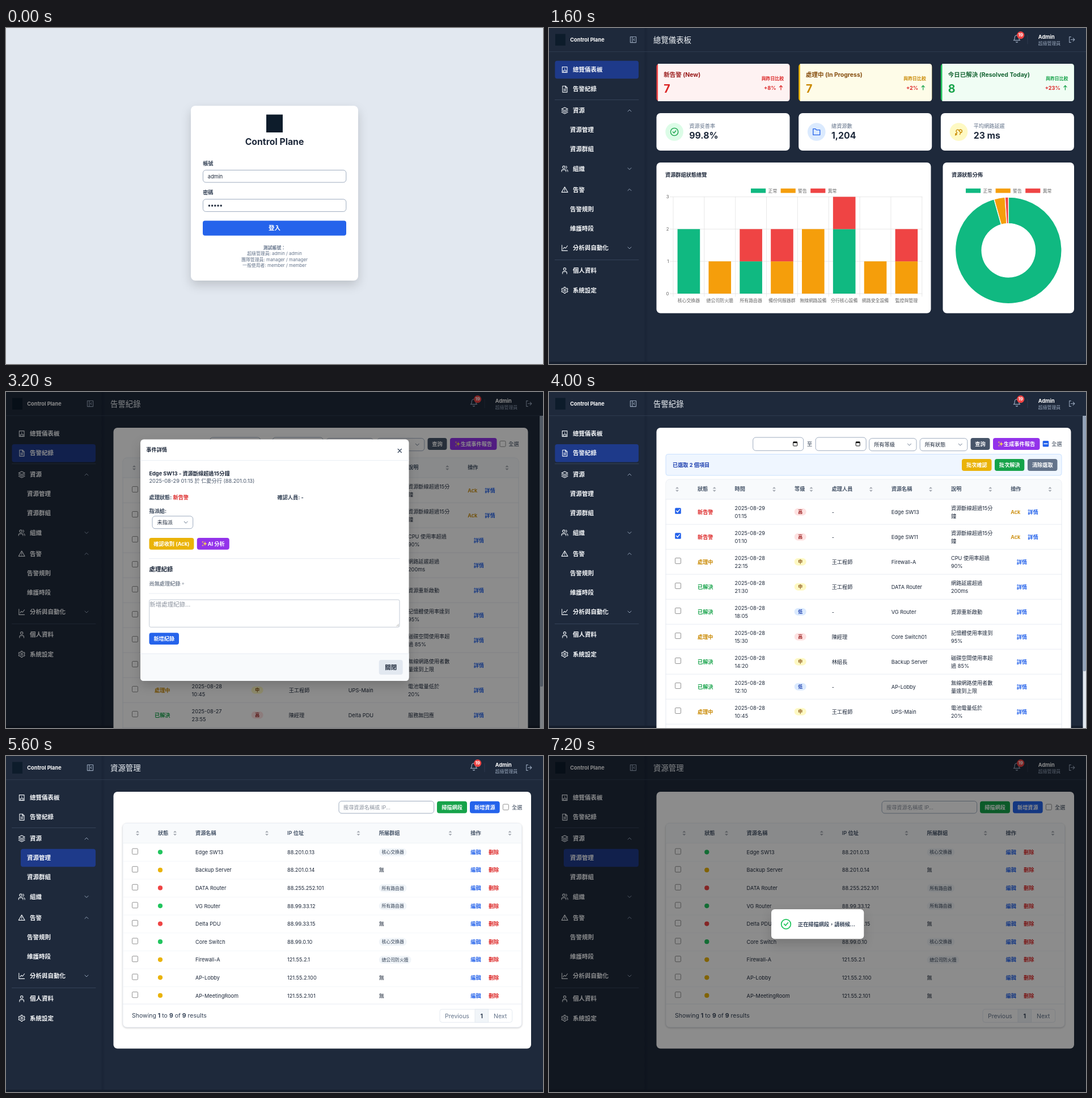
Recreate the animation shown at these times as an HTML page. Size 947x592 px, loop 8000 ms.

```html
<!DOCTYPE html>
<html lang="zh-Hant">
<head>
<meta charset="utf-8">
<title>Control Plane</title>
<style>
html, body { margin: 0; width: 100%; height: 100%; overflow: hidden; background: #1e293b; }
svg { display: block; width: 947px; height: 592px; }
text { font-family: Inter, "Noto Sans CJK TC", "Noto Sans CJK", sans-serif; white-space: pre; }
.scene { display: none; }
.scene.on { display: inline; }
.lift { filter: drop-shadow(0 8px 9px rgba(0,0,0,.16)); }
.low { filter: drop-shadow(0 1px 1.5px rgba(0,0,0,.2)); }
</style>
</head>
<body>
<svg id="stage" viewBox="0 0 947 592"></svg>
<script>
const C = {
  ink: '#1e293b', text: '#334155', mute: '#64748b', line: '#e2e8f0', edge: '#94a3b8',
  blue: '#2563eb', red: '#dc2626', gold: '#ca8a04', green: '#16a34a', purple: '#9333ea',
  slate: '#475569', ok: '#10b981', warn: '#f59e0b', bad: '#ef4444', logo: '#0d1c2b'
};
const S = 7.9, M = 9.2, L = 10.5, XL = 13.15;

// y is the vertical middle of the line
const text = (x, y, s, size = M, fill = C.ink, weight = 400, anchor = 'start') =>
  `<text x="${x}" y="${y + size * .36}" font-size="${size}" font-weight="${weight}" fill="${fill}" text-anchor="${anchor}">${s}</text>`;
const bold = (x, y, s, size, fill, anchor) => text(x, y, s, size, fill, 700, anchor);
const box = (x, y, x2, y2, fill, r = 0, stroke = 'none', extra = '') =>
  `<rect x="${x}" y="${y}" width="${x2 - x}" height="${y2 - y}" rx="${r}" fill="${fill}" stroke="${stroke}" ${extra}/>`;
const dot = (x, y, r, fill) => `<circle cx="${x}" cy="${y}" r="${r}" fill="${fill}"/>`;
const path = (d, stroke, w = 1, fill = 'none') =>
  `<path d="${d}" fill="${fill}" stroke="${stroke}" stroke-width="${w}" stroke-linecap="round" stroke-linejoin="round"/>`;
const rule = (x, x2, y, color = C.line) => path(`M${x} ${y}H${x2}`, color, .8);
const button = (x, y, x2, y2, fill, label, size = M, color = '#fff') =>
  box(x, y, x2, y2, fill, 4) + bold((x + x2) / 2, (y + y2) / 2, label, size, color, 'middle');
const field = (x, y, x2, y2, r = 5) => box(x, y, x2, y2, '#fff', r, C.edge, 'stroke-width=".9"');
const chevron = (x, y, dir = 1, color = C.mute) => path(`M${x - 3} ${y - 1.5 * dir}l3 ${3 * dir}l3 ${-3 * dir}`, color, 1);
const select = (x, y, x2, y2, label) =>
  field(x, y, x2, y2) + text(x + 8.5, (y + y2) / 2, label) + chevron(x2 - 12.5, (y + y2) / 2);
const sorter = (x, y) => path(`M${x - 3} ${y - 1.3}h6l-3-3zM${x - 3} ${y + 1.3}h6l-3 3z`, 'none', 0, '#a3a8b0');
const check = (x, y, state) => state
  ? box(x - 5.3, y - 5.3, x + 5.3, y + 5.3, C.blue, 1.6) +
    path(state == 'some' ? `M${x - 3} ${y}h6` : `M${x - 2.8} ${y}l2 2.2l3.6-4.6`, '#fff', 1.4)
  : box(x - 5, y - 5, x + 5, y + 5, '#fff', 1.6, '#767676', 'stroke-width=".8"');
const close = (x, y) => path(`M${x - 3} ${y - 3}l6 6m0-6l-6 6`, C.slate, 1.5);
const star = (x, y, r, fill) => {
  const q = r * .22;
  return path(`M${x} ${y - r}L${x + q} ${y - q}L${x + r} ${y}L${x + q} ${y + q}L${x} ${y + r}L${x - q} ${y + q}L${x - r} ${y}L${x - q} ${y - q}z`, 'none', 0, fill);
};
const sparkle = (x, y, fill) => star(x + 1, y, 4.2, fill) + star(x - 3, y - 3, 2, fill) + star(x - 3, y + 3.2, 1.8, fill);

const icons = {
  board: 'M4 3h16v18H4zM4 16h5l2-3h3l2 3h4M12 8v1M9 21v-3M15 21v-3',
  file: 'M5 2h10l5 5v15H5zM14 2v6h6M9 12h7M9 16h7',
  layers: 'M12 2L2 7l10 5l10-5zM2 12l10 5l10-5M2 17l10 5l10-5',
  users: 'M2 21v-2a4 4 0 0 1 4-4h6a4 4 0 0 1 4 4v2M5 7a4 4 0 1 0 8 0a4 4 0 1 0-8 0M22 21v-2a4 4 0 0 0-3-3.9M16 3.2a4 4 0 0 1 0 7.7',
  alert: 'M12 3L2 20h20zM12 9v5M12 17v.2',
  chart: 'M3 3v18h18M7 15l4-5l4 3l6-8',
  user: 'M8 7a4 4 0 1 0 8 0a4 4 0 1 0-8 0M5 22v-3a4 4 0 0 1 4-4h6a4 4 0 0 1 4 4v3',
  gear: 'M9 12a3 3 0 1 0 6 0a3 3 0 1 0-6 0M10 2h4l.6 3l2.6 1.5l3-1l2 3.5l-2.3 2v2l2.3 2l-2 3.5l-3-1l-2.6 1.5l-.6 3h-4l-.6-3l-2.6-1.5l-3 1l-2-3.5l2.3-2v-2l-2.3-2l2-3.5l3 1l2.6-1.5z',
  panel: 'M3 3h18v18H3zM9 3v18M16 9l-3 3l3 3',
  bell: 'M6 9a6 6 0 0 1 12 0c0 7 3 8 3 8H3s3-1 3-8M10 21a2 2 0 0 0 4 0',
  exit: 'M9 21H4V3h5M16 17l5-5l-5-5M21 12H9',
  done: 'M2 12a10 10 0 1 0 20 0a10 10 0 1 0-20 0M8 12l3 3l5-6',
  folder: 'M3 4h6l3 3h9v13H3z',
  rocket: 'M3 21l5-7M8 14a4 4 0 1 1 5-5a4 4 0 1 1 4 5l-4-5M4 16a2 2 0 1 0 3 3M17 14l-2 5'
};
const icon = (name, x, y, size, color, w = 2) =>
  `<g transform="translate(${x - size / 2} ${y - size / 2}) scale(${size / 24})">${path(icons[name], color, w)}</g>`;

const menu = [
  ['總覽儀表板', 73.5, 'board'], ['告警紀錄', 107.7, 'file'], ['資源', 145.5, 'layers', -1],
  ['資源管理', 179.5], ['資源群組', 213.7], ['組織', 248, 'users', 1], ['告警', 285, 'alert', -1],
  ['告警規則', 319], ['維護時段', 353.2], ['分析與自動化', 387.5, 'chart', 1],
  ['個人資料', 427.5, 'user'], ['系統設定', 462, 'gear']
];

function shell(title, bell = '#94a3b8') {
  let s = box(0, 0, 947, 592, C.ink) + box(167, 0, 175, 592, 'url(#seam)') + box(0, 588, 947, 592, '#151e2d');
  s += rule(0, 947, 41.7, '#334155') + box(11, 10.5, 29, 31, C.logo) + bold(37.3, 20.7, 'Control Plane', M, '#fff');
  s += icon('panel', 148.5, 20.5, 13.5, '#94a3b8') + text(184, 20.7, title, 13.4, '#f1f5f9', 500);
  s += icon('bell', 825, 18.5, 15, bell) + dot(831.7, 12.6, 6.6, C.bad) + bold(831.7, 12.6, '19', S, '#fff', 'middle');
  s += path('M844 13V28', '#334155', .8) + bold(862.8, 16, 'Admin', M, '#fff') + text(862.8, 27.5, '超級管理員', S, '#94a3b8');
  s += icon('exit', 922, 20.5, 13, '#94a3b8') + rule(10.5, 158, 126.5, '#3b4a60') + rule(10.5, 158, 408.5, '#3b4a60');
  for (const [label, y, ic, dir] of menu) {
    if (label == title) s += box(ic ? 10.5 : 26, y - 15.7, 158, y + 15.7, '#1e3a8a', 4);
    if (ic) s += icon(ic, 27.7, y, 13, '#f1f5f9');
    if (dir) s += chevron(142, y, dir, '#94a3b8');
    s += bold(ic ? 42 : 37, y, label, L, '#f8fafc');
  }
  return s;
}

function login() {
  let s = box(0, 0, 947, 592, '#e2e8f0') + box(326, 137, 621, 445, '#fff', 8, 'none', 'class="lift"');
  s += box(459, 152.5, 488, 184, C.logo) + bold(473.5, 200.5, 'Control Plane', 15.8, C.ink, 'middle');
  s += bold(347.2, 238.3, '帳號', M, C.text) + field(347.4, 250.4, 599.8, 272) + text(355.8, 261.3, 'admin');
  s += bold(347.2, 289.5, '密碼', M, C.text) + field(347.4, 301.7, 599.8, 323.4);
  for (let i = 0; i < 5; i++) s += dot(358.4 + i * 5.2, 313, 1.7, C.ink);
  s += button(347, 339.5, 600, 365.7, C.blue, '登入', L);
  s += bold(473.5, 386.7, '測試帳號：', S, C.mute, 'middle');
  ['超級管理員: admin / admin', '團隊管理員: manager / manager', '一般使用者: member / member']
    .forEach((t, i) => s += text(473.5, 397.2 + i * 10.5, t, S, C.mute, 400, 'middle'));
  return s;
}

function legend(x) {
  return [['正常', C.ok], ['警告', C.warn], ['異常', C.bad]].map(([t, c], i) =>
    box(x + i * 52.6, 282.8, x + 26.2 + i * 52.6, 290.6, c) + text(x + 30.5 + i * 52.6, 286.8, t, S, '#666')).join('');
}

function slice(from, to, color) {
  const at = (a, r) => `${810.3 + r * Math.sin(a * Math.PI / 180)} ${391.8 - r * Math.cos(a * Math.PI / 180)}`;
  const big = to - from > 180 ? 1 : 0, R = 93.8, r = 47.2;
  return path(`M${at(from, R)}A${R} ${R} 0 ${big} 1 ${at(to, R)}L${at(to, r)}A${r} ${r} 0 ${big} 0 ${at(from, r)}z`, '#fff', 1.3, color);
}

function dashboard() {
  let s = shell('總覽儀表板');
  const top = [
    ['新告警 (New)', 7, '+8%', '#fef2f2', C.bad, '#991b1b', C.red, C.red],
    ['處理中 (In Progress)', 7, '+2%', '#fefce8', '#eab308', '#854d0e', C.gold, C.green],
    ['今日已解決 (Resolved Today)', 8, '+23%', '#f0fdf4', '#22c55e', '#166534', C.green, C.green]
  ];
  top.forEach(([t, n, pct, bg, bar, dark, mid, arrow], i) => {
    const x = 189.5 + i * 250.7;
    s += box(x, 63, x + 235, 129, bar, 5) + path(`M${x + 2.6} 63H${x + 230}q5 0 5 5V124q0 5-5 5H${x + 2.6}z`, 'none', 0, bg);
    s += bold(x + 12.8, 82, t, L, dark) + bold(x + 12.8, 106.5, n, 19.7, mid);
    s += bold(x + 224.6, 89.2, '與昨日比較', S, mid, 'end') + bold(x + 211, 105.3, pct, M, C.red, 'end');
    s += path(`M${x + 219.5} 109V101.5m-2.6 2.6l2.6-2.6l2.6 2.6`, arrow, 1.2);
  });
  const facts = [
    ['資源妥善率', '99.8%', 'done', '#dcfce7', C.green], ['總資源數', '1,204', 'folder', '#dbeafe', C.blue],
    ['平均網路延遲', '23 ms', 'rocket', '#fef9c3', C.gold]
  ];
  facts.forEach(([t, v, ic, bg, c], i) => {
    const x = 189.5 + i * 250.7;
    s += box(x, 150, x + 235, 216, '#fff', 7) + dot(x + 31.6, 183, 15.8, bg) + icon(ic, x + 31.6, 183, 16, c);
    s += text(x + 57.8, 172.3, t, M, C.mute) + bold(x + 57.8, 189.7, v, 15.8);
  });
  s += box(189.5, 237, 673.5, 502.5, '#fff', 7) + box(694.5, 237, 926, 502.5, '#fff', 7);
  s += bold(205, 259, '資源群組狀態總覽') + bold(710, 259, '資源狀態分佈') + legend(356) + legend(735);
  const step = 54.85, unit = 56.85, base = 468;
  for (let v = 0; v < 4; v++) s += rule(213.5, 658, base - v * unit, '#e3e3e3') + text(211.5, base - v * unit, v, S, '#666', 400, 'end');
  for (let i = 0; i < 9; i++) s += path(`M${219 + i * step} 297.5V473`, '#e3e3e3', .8);
  const bars = [
    ['核心交換器', 2, 0, 0], ['總公司防火牆', 0, 1, 0], ['所有路由器', 1, 0, 1], ['備份伺服器群', 0, 1, 1],
    ['無線網路設備', 0, 2, 0], ['分行核心設備', 2, 0, 1], ['網路安全設備', 0, 1, 0], ['監控與管理', 0, 1, 1]
  ];
  bars.forEach(([t, ...vals], i) => {
    const x = 219 + (i + .5) * step;
    let y = base;
    vals.forEach((v, k) => {
      if (v) s += box(x - 19.8, y - v * unit, x + 19.8, y, [C.ok, C.warn, C.bad][k]);
      y -= v * unit;
    });
    s += text(x, 480, t, S, '#666', 400, 'middle');
  });
  return s + slice(0, 344.3, C.ok) + slice(344.3, 356.3, C.warn) + slice(356.3, 360, C.bad);
}

const states = { 新: ['新告警', C.red], 處: ['處理中', C.gold], 已: ['已解決', C.green] };
const levels = { 高: ['#fee2e2', '#991b1b'], 中: ['#fef9c3', '#854d0e'], 低: ['#dbeafe', '#1e40af'] };
const alerts = [
  '新|2025-08-29|01:15|高|-|Edge SW13|資源斷線超過15分|鐘',
  '新|2025-08-29|01:10|高|-|Edge SW11|資源斷線超過15分|鐘',
  '處|2025-08-28|22:15|中|王工程師|Firewall-A|CPU 使用率超過|90%',
  '已|2025-08-28|21:30|中|王工程師|DATA Router|網路延遲超過|200ms',
  '已|2025-08-28|18:05|低|-|VG Router|資源重新啟動',
  '處|2025-08-28|15:30|高|陳經理|Core Switch01|記憶體使用率達到|95%',
  '已|2025-08-28|14:20|中|林組長|Backup Server|磁碟空間使用率超|過 85%',
  '已|2025-08-28|12:10|低|-|AP-Lobby|無線網路使用者數|量達到上限',
  '處|2025-08-28|10:45|中|王工程師|UPS-Main|電池電量低於|20%',
  '已|2025-08-27|23:55|高|陳經理|Delta PDU|服務無回應'
];

function alertList(picked, bell) {
  const off = picked ? 38 : 0;
  let s = shell('告警紀錄', bell) + box(189.5, 63, 920.5, 610, '#fff', 7);
  s += box(941.5, 42, 947, 592, '#e2e8f0') + box(941.5, 42, 947, picked ? 492 : 519, '#94a3b8', 2);
  for (const x of [359.7, 470.2]) {
    s += field(x, 80, x + 89, 103.3) + box(x + 71, 88, x + 78, 95, 'none', .8, '#111', 'stroke-width="1"') + box(x + 71, 87.5, x + 78, 90, '#111');
  }
  s += text(459.6, 91.5, '至', M, C.text, 400, 'middle') + select(564.7, 81.7, 648, 103.7, '所有等級') + select(654.2, 81.7, 737.8, 103.7, '所有狀態');
  s += button(743.5, 81, 777.5, 102, C.slate, '查詢') + box(783, 81, 865.5, 102, C.purple, 4) + sparkle(796.5, 91.5, '#fde047') + bold(802, 91.5, '生成事件報告', M, '#fff');
  s += check(876, 91.3, picked && 'some') + text(886.3, 91.5, '全選', M, C.text);
  if (picked) {
    s += box(206, 109.5, 904, 147, '#eff6ff', 4, '#bfdbfe', 'stroke-width=".8"') + bold(218, 128.5, '已選取 2 個項目', M, '#1e40af');
    s += button(728, 118, 780.5, 139, '#eab308', '批次確認') + button(786, 118, 838.3, 139, C.green, '批次解決') + button(844, 118, 896.5, 139, C.mute, '清除選取');
  }
  s += `<g transform="translate(0 ${off})">` + box(206, 116, 904, 620, '#fff', 7, C.line, 'stroke-width=".9"');
  s += path('M206.4 151V123q0-6.6 6.6-6.6H897q6.6 0 6.6 6.6V151z', 'none', 0, '#f8fafc') + rule(206, 904, 151);
  const heads = [['', 0, 226], ['狀態', 262, 291.7], ['時間', 327.6, 397], ['等級', 433, 462.5], ['處理人員', 498.7, 567.8], ['資源名稱', 603.7, 673], ['說明', 709, 778.3], ['操作', 814.2, 883.5]];
  for (const [t, x, sx] of heads) s += text(x, 133, t, M, C.slate, 600) + sorter(sx, 133.5);
  alerts.forEach((row, i) => {
    const y = 173.2 + i * 44, [st, day, time, lv, who, res, d1, d2] = row.split('|');
    const [label, color] = states[st], [bg, fg] = levels[lv];
    s += check(227.5, y - 1.7, picked && i < 2) + bold(262, y, label, M, color);
    s += text(327.6, y - 6.8, day) + text(327.6, y + 7, time);
    s += box(432.7, y - 6.5, 453.6, y + 6.5, bg, 6.5) + bold(443.2, y, lv, S, fg, 'middle');
    s += text(498.7, y, who) + text(603.7, y, res);
    s += d2 ? text(709, y - 6.8, d1) + text(709, y + 7, d2) : text(709, y, d1);
    if (i < 2) s += text(814.2, y, 'Ack', M, C.gold, 600);
    s += bold(i < 2 ? 844.3 : 824.7, y, '詳情', M, C.blue) + rule(206, 904, y + 22);
  });
  return s + '</g>';
}

const dim = box(0, 0, 947, 592, '#000', 0, 'none', 'opacity=".45"');
const modal = (y, y2, headY, footY) => dim + box(237, y, 710.5, y2, '#fff', 6, 'none', 'class="lift"') +
  path(`M237 ${footY}H710.5V${y2 - 6}q0 6-6 6H243q-6 0-6-6z`, 'none', 0, '#f8fafc') +
  rule(237, 710.5, headY) + rule(237, 710.5, footY);

function detail() {
  let s = alertList(false) + modal(83.5, 509, 120.7, 461);
  s += bold(247.3, 102, '事件詳情') + close(694.3, 103.5) + bold(252.5, 143.3, 'Edge SW13 - 資源斷線超過15分鐘');
  s += text(252.5, 156.7, '2025-08-29 01:15 於 仁愛分行 (88.201.0.13)', M, C.slate);
  s += bold(252.5, 185.5, '處理狀態: <tspan fill="#dc2626">新告警</tspan>', M, C.text) + bold(478.5, 185.5, '確認人員: -', M, C.text);
  s += bold(252.5, 209.3, '指派給:', M, C.text) + select(258, 218.7, 329.7, 240.7, '未指派');
  s += button(252.5, 257, 331.4, 277.7, '#eab308', '確認收到 (Ack)') + box(336.8, 257, 393.8, 277.7, C.purple, 4) + sparkle(350, 267.3, '#fde047') + bold(355.7, 267.3, 'AI 分析', M, '#fff');
  s += rule(252.5, 694.3, 293.5) + bold(252.5, 312.7, '處理紀錄', L) + text(252.5, 337.5, '尚無處理紀錄。', M, C.slate) + rule(252.5, 694.3, 355);
  s += box(252.7, 366, 694, 414.3, '#fff', 2.5, '#bcc5d1', 'stroke-width=".9"') + text(253.2, 374.7, '新增處理紀錄...', L, '#8b929e') + path('M689 412.5l3.5-3.5M691.3 412.7l1.4-1.4', '#888', .7);
  return s + button(252.5, 424.3, 305, 445, C.blue, '新增紀錄') + button(657.7, 472, 699.7, 498, C.line, '關閉', L, C.ink);
}

// y, x, line; a leading "-" gives the line a bullet
const report = [
  [121.3, 252.5, '**1. 事件摘要:'],
  [175.7, 252.5, '26 左右，監控系統偵測到仁愛分行兩台核心交換器 (Edge SW13, Edge SW11) 同時發生斷線'],
  [191.5, 252.5, '告警，持續時間超過15分鐘。此事件可能導致該分行內部網路服務全面中斷。 **2. 事件時間'],
  [207.3, 252.5, '軸:'],
  [267.4, 252.5, '26: 系統發出告警，資源 Edge SW13 (88.201.0.13) 斷線超過15分鐘。'],
  [283, 268.2, '-2025.8.26 10:26: 系統發出告警，資源 Edge SW11 (88.201.0.11) 斷線超過15分鐘。'],
  [309.4, 252.5, '**3. 影響評估:** 由於斷線資源為分行核心交換器，預期將造成以下影響：'],
  [325, 268.2, '-分行所有員工的電腦無法上網及存取內部資源。'],
  [341, 284, '-分行對外業務系統 (如：交易系統) 可能中斷。'],
  [356.7, 299.8, '-IP 電話、印表機等網路資源無法使用。'],
  [383, 284, '**4. 根本原因分析:** 兩台位於同一分行的核心交換器在完全相同的時間點斷線，極不'],
  [398.7, 284, '可能是單一資源故障。最可能的原因指向該分行的**上層網路或基礎設施問題**，例'],
  [414.4, 284, '如：'],
  [430.3, 299.8, '-**總電源中斷：** 該分行或機櫃發生跳電。'],
  [446.2, 315.6, '-**上聯路由器故障：** 連接總公司的主要路由器 (Router) 當機或斷線。'],
  [462, 331.4, '-**線路問題：** 該分行的主要對外線路中斷。'],
  [488.4, 315.6, '**5. 後續處理建議:**'],
  [504.2, 331.4, '-**立即行動：** 立刻聯繫仁愛分行IT人員，確認現場電力與主要路由器狀']
];

function analysis() {
  let s = alertList(true) + modal(30, 562, 67, 515);
  s += star(257.3, 49, 5, C.purple) + star(251.5, 44.5, 2.6, C.purple) + star(258, 42, 1.6, C.purple);
  s += bold(268.2, 48, 'Quorvi AI 分析報告') + close(694.3, 49.5) + box(705, 67.5, 710.5, 514.6, '#f1f5f9') + box(705, 67.5, 710.5, 431, '#94a3b8', 2);
  s += bold(252.5, 92.5, '網路事件報告：仁愛分行多重資源斷線事件', XL) + bold(252.5, 153.7, '本日上午 10:', 11.8);
  s += dot(260.7, 240.5, 1.5, C.ink) + bold(268.2, 240, '2025.8.26 10:', 11.8);
  for (const [y, x, t] of report) {
    const item = t[0] == '-';
    s += (item ? dot(x - 7.2, y + .5, 1.4, C.text) : '') + text(x, y, item ? t.slice(1) : t, L, C.text);
  }
  return s + button(247.2, 525.7, 310.4, 552, C.slate, '複製報告', L);
}

const G = '#22c55e', Y = '#eab308', R = '#ef4444';
const assets = [
  [G, 'Edge SW13', '88.201.0.13', '核心交換器'], [Y, 'Backup Server', '88.201.0.14'],
  [R, 'DATA Router', '88.255.252.101', '所有路由器'], [G, 'VG Router', '88.99.33.12', '所有路由器'],
  [R, 'Delta PDU', '88.99.33.15'], [G, 'Core Switch', '88.99.0.10', '核心交換器'],
  [Y, 'Firewall-A', '121.55.2.1', '總公司防火牆'], [Y, 'AP-Lobby', '121.55.2.100'], [Y, 'AP-MeetingRoom', '121.55.2.101']
];

function assetList(cols, sorts) {
  let s = shell('資源管理') + box(189.5, 63, 926, 515.5, '#fff', 7);
  s += field(587, 79.5, 754.7, 101) + text(595, 90.3, '搜尋資源名稱或 IP...', M, '#8b929e');
  s += button(760, 79.7, 813, 100.7, C.green, '掃描網段') + button(818, 79.7, 870.7, 100.7, C.blue, '新增資源') + check(881.4, 90) + text(892, 90.3, '全選', M, C.text);
  s += box(206, 118.5, 909.5, 478, '#fff', 7, C.line, 'stroke-width=".8" class="low"');
  s += path('M206.4 153.5V125q0-6.2 6.2-6.2H903q6.2 0 6.2 6.2V153.5z', 'none', 0, '#f8fafc') + rule(206, 909.5, 153.5, '#edf1f5');
  const [st, name, ip, group, act] = cols;
  ['狀態', '資源名稱', 'IP 位址', '所屬群組', '操作'].forEach((t, i) => s += text(cols[i], 135.7, t, M, C.slate, 600));
  sorts.forEach(x => s += sorter(x, 136));
  assets.forEach(([c, n, addr, g], i) => {
    const y = 169.6 + i * 31.58;
    s += check(227.5, y - 1.5) + dot(st + 4, y - .3, 4.1, c) + text(name, y, n) + text(ip, y, addr);
    s += g ? box(group, y - 7, group + g.length * S + 9.5, y + 7, '#f1f5f9', 7) + text(group + 4.7, y, g, S, C.text) : text(group, y, '無');
    s += bold(act, y, '編輯', M, C.blue) + bold(act + 31.6, y, '刪除', M, C.red);
    if (i < 8) s += rule(206.5, 909, y + 15.8, '#f1f5f9');
  });
  const b = n => `<tspan font-weight="700">${n}</tspan>`;
  s += rule(206, 909.5, 437) + text(222, 457.7, `Showing ${b(1)} to ${b(9)} of ${b(9)} results`, L, C.text);
  s += box(765, 446.2, 892.7, 469.3, '#fff', 4, C.line, 'stroke-width=".9"') + box(827, 446.2, 850.5, 469.3, '#f1f5f9', 0, C.line, 'stroke-width=".9"');
  return s + text(774, 458, 'Previous', L, C.mute) + bold(838.7, 458, '1', L, C.text, 'middle') + text(860, 458, 'Next', L, C.mute);
}

function scanning() {
  return assetList([274.3, 348.6, 516.8, 666.5, 805.5], [238.3, 313, 480.8, 630.5, 769.7, 888.5]) + dim +
    box(392, 270, 555.3, 322.3, '#fff', 6, 'none', 'class="lift"') +
    icon('done', 418, 296.2, 20, G, 2.1) + bold(439, 296.3, '正在掃描網段，請稍候...', M, C.text);
}

const scenes = [
  [0, login()],
  [800, dashboard()],
  [2400, alertList(false, '#fff')],
  [3200, detail()],
  [4000, alertList(true)],
  [4800, analysis()],
  [5600, assetList([268, 334, 496, 657.7, 819.3], [232, 298, 460, 621.5, 783.5, 888.5])],
  [6400, scanning()]
];
const LOOP = 8000;
const stage = document.getElementById('stage');
stage.innerHTML = '<defs><linearGradient id="seam"><stop stop-color="#0f172a" stop-opacity="0"/><stop offset=".4" stop-color="#0f172a" stop-opacity=".25"/><stop offset="1" stop-color="#0f172a" stop-opacity="0"/></linearGradient></defs>' +
  scenes.map(([, html]) => `<g class="scene">${html}</g>`).join('');
const groups = [...stage.querySelectorAll('.scene')];
const start = performance.now();
let shown = -1;

function tick() {
  const t = (performance.now() - start) % LOOP;
  const now = scenes.findLastIndex(([at]) => at <= t);
  if (now != shown) groups.forEach((g, i) => g.classList.toggle('on', i == now));
  shown = now;
  requestAnimationFrame(tick);
}
tick();
</script>
</body>
</html>
```
